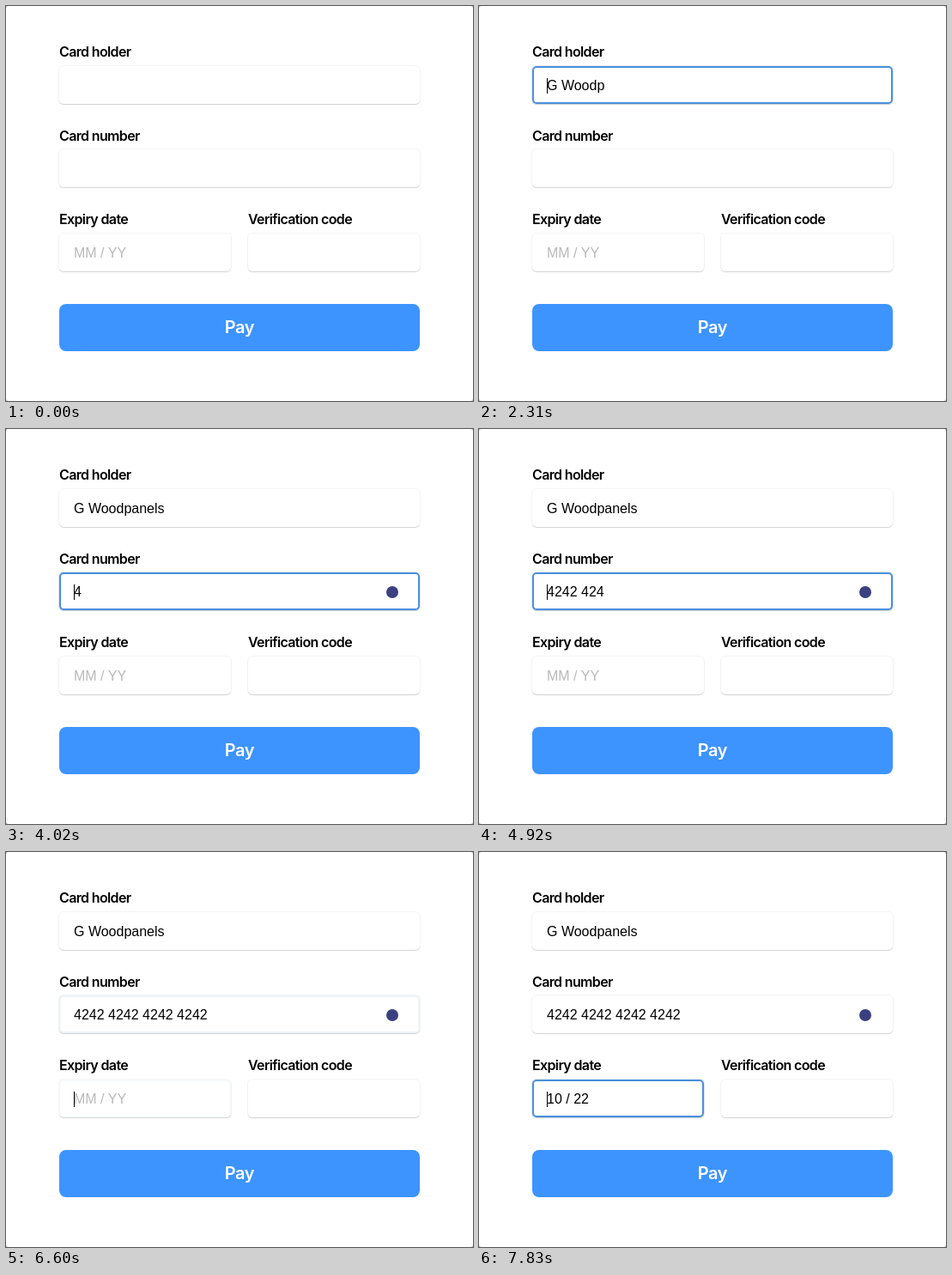
Animation, 544 px wide and 460 px high, one loop 8000 ms. Source, as an HTML page:

```html
<!DOCTYPE html>
<html lang="en">
<head>
<meta charset="utf-8">
<title>Card payment form</title>
<style>
  html, body { margin: 0; width: 100%; height: 100%; overflow: hidden; background: #aaa; }
  #stage { position: relative; width: 544px; height: 460px; background: #fff; border-radius: 3px; }
  #stage * { position: absolute; box-sizing: border-box; white-space: pre; }
  .label { font: 600 16px/20px Inter, sans-serif; letter-spacing: -.04em; color: #000; }
  .field {
    height: 44px; padding-left: 17px; border-radius: 5px; background: #fff; color: #000;
    font: 16px/45px "Liberation Sans", Arial, sans-serif;
    box-shadow: 0 0 0 1px rgba(0, 0, 0, .04), 0 1px 1px rgba(0, 0, 0, .14);
  }
  .field .text { position: static !important; }
  .hint { left: 17px; color: #b9b9b9; }
  .caret { top: 14px; width: 1px; height: 18px; background: #000; }
  .ring {
    inset: 0; border: 2px solid #4a90dc; border-radius: 5px;
    box-shadow: 0 0 2px rgba(74, 144, 226, .35);
  }
  .brand { left: 381px; top: 16px; width: 14px; height: 14px; border-radius: 50%; background: #3a4080; }
  .pay {
    left: 62px; top: 347px; width: 420px; height: 55px; border-radius: 8px;
    background: #3d94ff; color: #fff; text-align: center;
    font: 600 20px/55px Inter, sans-serif; letter-spacing: -.02em;
  }
</style>
</head>
<body>
<div id="stage"><div class="pay">Pay</div></div>
<script>
const LOOP = 8000, BLINK = 480;
const stage = document.getElementById('stage');

const clamp = v => Math.min(1, Math.max(0, v));
const run = (start, gap, count) => Array.from({ length: count }, (_, i) => start + i * gap);

function add(parent, className, text = '') {
  const el = document.createElement('div');
  el.className = className;
  el.textContent = text;
  return parent.appendChild(el);
}

function place(el, x, y, width) {
  el.style.left = x + 'px';
  el.style.top = y + 'px';
  if (width) el.style.width = width + 'px';
  return el;
}

function makeField({ label, labelY, x = 62, y, width, hint = '', ...behaviour }) {
  place(add(stage, 'label', label), x, labelY);
  const box = place(add(stage, 'field'), x, y, width);
  const text = box.appendChild(document.createElement('span'));
  text.className = 'text';
  return {
    ...behaviour, box, text,
    caret: add(box, 'caret'), hint: add(box, 'hint', hint), ring: add(box, 'ring')
  };
}

const plain = s => s;
const groupDigits = s => s.replace(/\d{4}(?!$)|^\d{4}$|^\d{8}$|^\d{12}$/g, '$& ')
  .replace(/(\d{4} )(\d{4})$/, (m, a, b) => s.length < 16 ? a + b + ' ' : m);
const splitDate = s => s.length < 2 ? s : s.slice(0, 2) + ' / ' + s.slice(2);

const holder = makeField({
  label: 'Card holder', labelY: 43, y: 70, width: 420,
  value: 'G Woodpanels', format: plain, focus: 570, blur: 3120,
  keys: [...run(1470, 140, 7), 2460, ...run(2550, 100, 4)]
});
const number = makeField({
  label: 'Card number', labelY: 141, y: 167, width: 420,
  value: '4242'.repeat(4), format: groupDigits, focus: 3120, blur: 6570,
  keys: [...run(3960, 140, 4), ...run(4590, 165, 2), ...run(4920, 120, 10)]
});
const expiry = makeField({
  label: 'Expiry date', labelY: 238, y: 265, width: 200, hint: 'MM / YY',
  value: '1022', format: splitDate, focus: 6570, blur: Infinity,
  keys: [...run(7290, 120, 2), ...run(7650, 150, 2)]
});
makeField({ label: 'Verification code', labelY: 238, x: 282, y: 265, width: 200 }).box
  .querySelectorAll('.caret, .ring').forEach(el => el.remove());
const brand = add(number.box, 'brand');

function drawField(f, t) {
  const typed = f.keys.filter(k => k <= t);
  const focused = t >= f.focus && t < f.blur;
  const lastEdit = Math.max(f.focus, ...typed);
  const caretOn = focused && Math.floor((t - lastEdit) / BLINK) % 2 === 0;
  f.text.textContent = f.format(f.value.slice(0, typed.length));
  f.caret.style.visibility = caretOn ? 'visible' : 'hidden';
  f.hint.style.visibility = typed.length ? 'hidden' : 'visible';
  // The old outline fades first, then the new one comes in.
  const shown = clamp((t - f.focus - 30) / 32);
  const gone = clamp((t - f.blur + 20) / 56);
  f.ring.style.opacity = shown * (1 - gone);
  return typed.length;
}

function frame(now) {
  const t = now % LOOP;
  drawField(holder, t);
  brand.style.visibility = drawField(number, t) ? 'visible' : 'hidden';
  drawField(expiry, t);
  requestAnimationFrame(frame);
}
frame(0);
</script>
</body>
</html>
```
